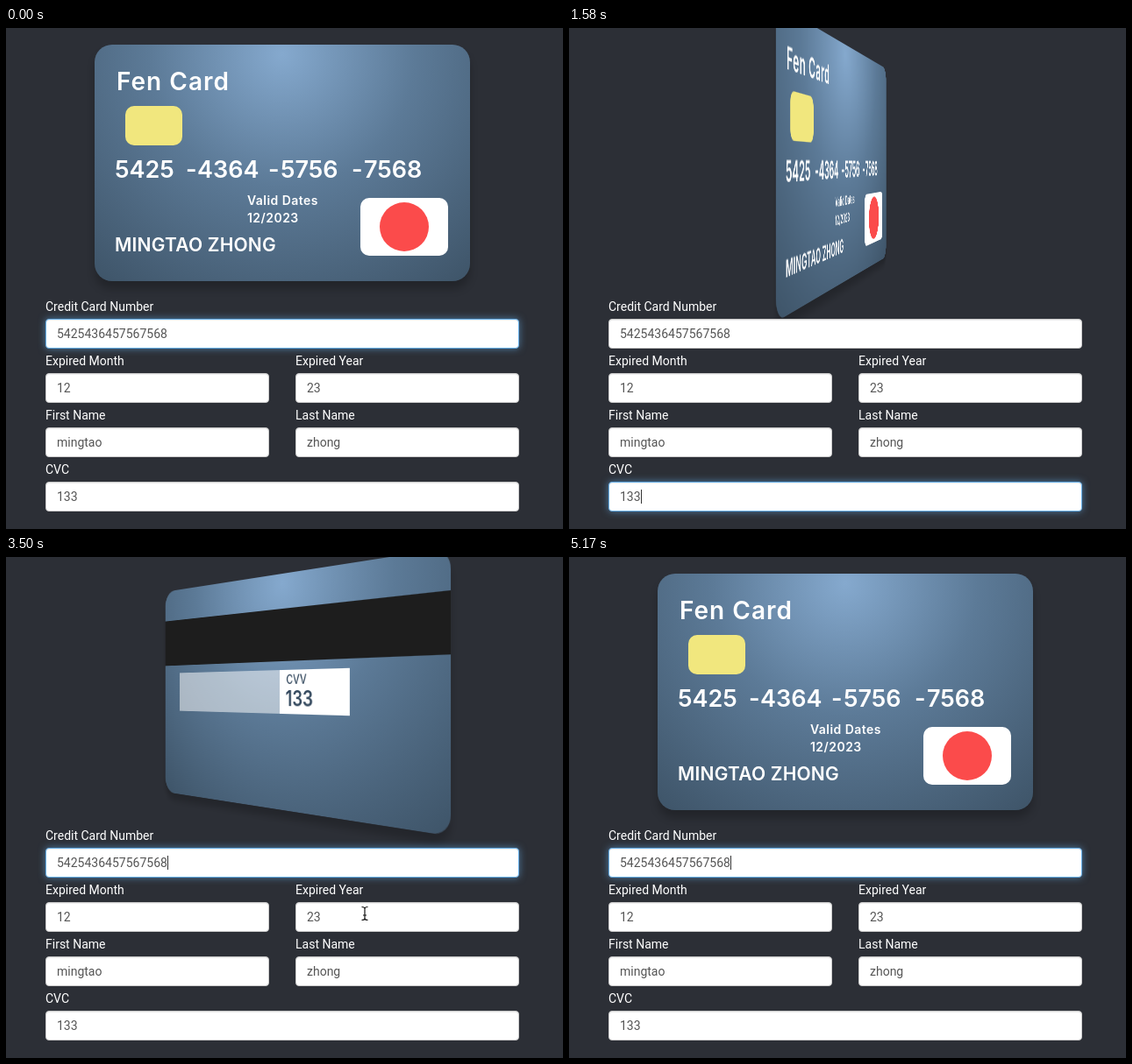
An HTML page that plays this animation: 635 by 572 pixels, repeating every 5.27 s.

```html
<!DOCTYPE html>
<html lang="en">
<head>
<meta charset="utf-8">
<title>Card form</title>
<style>
  html, body { margin: 0; width: 100%; height: 100%; overflow: hidden; background: #2c2f36; }
  #stage { position: relative; width: 635px; height: 572px; overflow: hidden; font: 14px/20px Roboto, sans-serif; }
  #stage * { position: absolute; box-sizing: border-box; white-space: pre; }

  /* card */
  #scene { left: 101px; top: 19px; width: 428px; height: 270px; perspective: 800px; }
  #card { inset: 0; transform-style: preserve-3d; animation: flip 5270ms ease infinite; }
  .face {
    inset: 0; border-radius: 20px; overflow: hidden; backface-visibility: hidden;
    background: radial-gradient(circle at 50% 4%, #85a9ce, #5c7a97 45%, #3e5468);
    color: #fff; font-family: Inter, sans-serif; font-weight: 600; line-height: 0;
  }
  .shadow { inset: 0; border-radius: 20px; backface-visibility: hidden; box-shadow: 0 9px 10px rgba(0, 0, 0, .22); }
  .back { transform: rotateY(180deg); }
  .title { left: 25px; top: 42px; font-size: 28px; letter-spacing: 1px; }
  .number span { top: 143px; font-size: 27px; }
  .small { left: 174px; font-size: 14px; letter-spacing: .45px; }
  .holder { left: 23px; top: 229px; font-size: 21px; letter-spacing: .2px; }
  .chip { left: 35px; top: 70px; width: 65px; height: 45px; border-radius: 10px; background: #f1e77e; }
  .panel { left: 303px; top: 175px; width: 100px; height: 66px; border-radius: 10px; background: #fff; }
  .dot { left: 22px; top: 5px; width: 56px; height: 56px; border-radius: 50%; background: #fb4b4b; }
  .stripe { left: 0; top: 40px; width: 428px; height: 60px; background: #1d1d1d; }
  .sign { left: 30px; top: 110px; width: 180px; height: 50px; background: rgba(255, 255, 255, .52); }
  .code { left: 210px; top: 110px; width: 100px; height: 50px; background: #fff; color: #34495e; }

  /* form */
  .row { left: 45px; width: 540px; height: 58px; color: #fff; }
  .half { width: 255px; }
  .right { left: 330px; }
  .field {
    left: 0; top: 24px; width: 100%; height: 34px; padding: 6px 12px;
    border: 1px solid #ccc; border-radius: 4px; background: #fff; color: #555;
    box-shadow: inset 0 1px 1px rgba(0, 0, 0, .075), 0 0 8px rgba(102, 175, 233, 0);
  }
  .caret { top: 8px; width: 1px; height: 16px; background: #333; opacity: 0; }
  #numField { animation: numFocus 5270ms ease-in-out infinite; }
  #cvcField { animation: cvcFocus 5270ms ease-in-out infinite; }
  #numStart { left: 12px; animation: blinkStart 5270ms step-end infinite; }
  #numEnd { left: 138px; animation: blinkEnd 5270ms step-end infinite; }
  #cvcEnd { left: 36px; animation: blinkCvc 5270ms step-end infinite; }

  #pointer { left: 0; top: 0; width: 0; height: 0; }
  #pointer svg { overflow: visible; width: 1px; height: 1px; }

  @keyframes flip {
    0%, 25.24% { transform: rotateY(0deg); }
    44.21%, 63.19% { transform: rotateY(180deg); }
    82.16%, 100% { transform: rotateY(0deg); }
  }
  @keyframes numFocus {
    0%, 25.43%, 63.57%, 100% {
      border-color: #66afe9;
      box-shadow: inset 0 1px 1px rgba(0, 0, 0, .075), 0 0 8px rgba(102, 175, 233, .6);
    }
    28.27%, 60.72% {
      border-color: #ccc;
      box-shadow: inset 0 1px 1px rgba(0, 0, 0, .075), 0 0 8px rgba(102, 175, 233, 0);
    }
  }
  @keyframes cvcFocus {
    0%, 25.43%, 63.57%, 100% {
      border-color: #ccc;
      box-shadow: inset 0 1px 1px rgba(0, 0, 0, .075), 0 0 8px rgba(102, 175, 233, 0);
    }
    28.27%, 60.72% {
      border-color: #66afe9;
      box-shadow: inset 0 1px 1px rgba(0, 0, 0, .075), 0 0 8px rgba(102, 175, 233, .6);
    }
  }
  @keyframes blinkStart { 0%, 16.6%, 100% { opacity: 0; } 8.3% { opacity: 1; } }
  @keyframes blinkCvc { 0%, 34.9%, 53.9%, 100% { opacity: 0; } 25.43%, 44.2% { opacity: 1; } }
  @keyframes blinkEnd { 0%, 70.8%, 89.8% { opacity: 0; } 60.72%, 80.3%, 97.9%, 100% { opacity: 1; } }
</style>
</head>
<body>
<div id="stage">
  <div id="scene">
    <div id="card">
      <div class="shadow"></div>
      <div class="shadow back"></div>
      <div class="face">
        <div class="title">Fen Card</div>
        <div class="chip"></div>
        <div class="number">
          <span style="left:23px">5425</span><span style="left:104px">-</span>
          <span style="left:117px">4364</span><span style="left:198px">-</span>
          <span style="left:212px">5756</span><span style="left:293px">-</span>
          <span style="left:307px">7568</span>
        </div>
        <div class="small" style="top:178px">Valid Dates</div>
        <div class="small" style="top:198px">12/2023</div>
        <div class="holder">MINGTAO ZHONG</div>
        <div class="panel"><div class="dot"></div></div>
      </div>
      <div class="face back">
        <div class="stripe"></div>
        <div class="sign"></div>
        <div class="code">
          <span style="left:10px;top:11px;font-size:14px;font-weight:500">CVV</span>
          <span style="left:9px;top:33px;font-size:24px">133</span>
        </div>
      </div>
    </div>
  </div>

  <div class="row" style="top:308px">Credit Card Number<div class="field" id="numField">5425436457567568<i class="caret" id="numStart"></i><i class="caret" id="numEnd"></i></div></div>
  <div class="row half" style="top:370px">Expired Month<div class="field">12</div></div>
  <div class="row half right" style="top:370px">Expired Year<div class="field">23</div></div>
  <div class="row half" style="top:432px">First Name<div class="field">mingtao</div></div>
  <div class="row half right" style="top:432px">Last Name<div class="field">zhong</div></div>
  <div class="row" style="top:494px">CVC<div class="field" id="cvcField">133<i class="caret" id="cvcEnd"></i></div></div>

  <div id="pointer">
    <svg id="arrow"><path d="M0 0V15.5L3.6 12.2 6 17.8 8.6 16.7 6.2 11.3H11Z" fill="#000" stroke="#fff"/></svg>
    <svg id="beam" fill="none">
      <path id="beamLine" d="M-3.5-7.5Q0-7.5 0-5.5Q0-7.5 3.5-7.5M0-5.5V5.5M-3.5 7.5Q0 7.5 0 5.5Q0 7.5 3.5 7.5M-2 2H2" stroke="#111" stroke-width="1.2"/>
    </svg>
  </div>
</div>
<script>
  const LOOP = 5270, STEP = 87.4, PHASE = 620;
  const $ = id => document.getElementById(id);
  const pointer = $('pointer'), arrow = $('arrow'), beam = $('beam');

  // pointer path: time, x, y
  const path = [
    [615, 592, 315], [708, 500, 385], [795, 412, 452], [882, 370, 506], [970, 366, 514],
    [1057, 363, 525], [1145, 363, 532], [2640, 363, 532], [2893, 378, 470], [3155, 408, 350],
    [3200, 409, 347], [4450, 409, 347], [4630, 450, 400], [4800, 575, 520], [4890, 617, 560]
  ];
  const fields = [...document.querySelectorAll('.field')].map(f => {
    const row = f.parentNode;
    return { x: row.offsetLeft, y: row.offsetTop + 24, w: row.offsetWidth, h: 34 };
  });
  const overField = (x, y) =>
    fields.some(f => x >= f.x && x < f.x + f.w && y >= f.y && y < f.y + f.h);

  function pointerAt(t) {
    const i = path.findIndex(p => p[0] > t);
    if (i < 0) return path[path.length - 1].slice(1);
    if (i === 0) return path[0].slice(1);
    const [a, b] = [path[i - 1], path[i]];
    const k = (t - a[0]) / (b[0] - a[0]);
    return [a[1] + (b[1] - a[1]) * k, a[2] + (b[2] - a[2]) * k];
  }

  const anims = document.getAnimations();
  anims.forEach(a => a.pause());

  function draw(t) {
    // the motion advances in steps, like a screen recording
    const s = Math.max(0, PHASE + Math.floor((t - PHASE + 8) / STEP) * STEP);
    anims.forEach(a => { a.currentTime = s; });
    const [x, y] = pointerAt(s);
    const text = overField(x, y);
    pointer.style.display = s > 612 && s < 4940 ? 'block' : 'none';
    pointer.style.transform = `translate(${Math.round(x)}px, ${Math.round(y)}px)`;
    arrow.style.display = text ? 'none' : 'block';
    beam.style.display = text ? 'block' : 'none';
  }

  const start = performance.now();
  function tick() {
    draw((performance.now() - start) % LOOP);
    requestAnimationFrame(tick);
  }
  tick();
</script>
</body>
</html>
```
